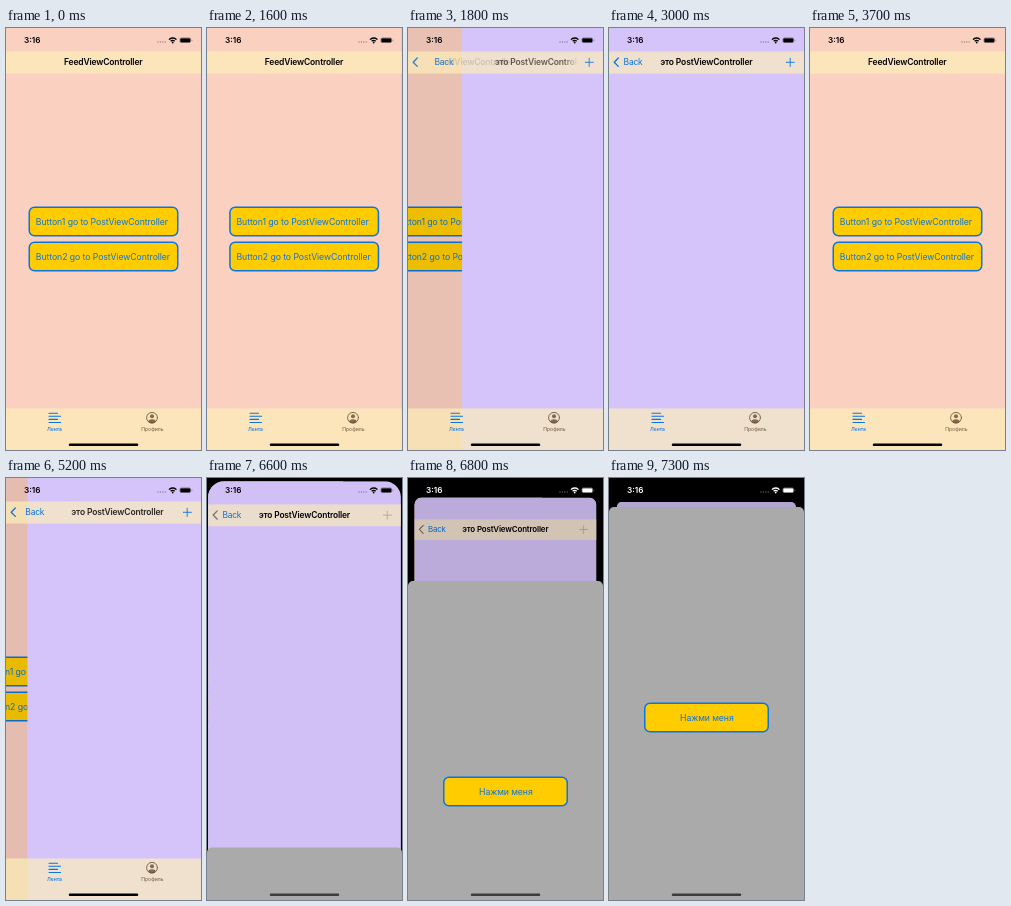
An HTML page with a canvas for the animation above (8000 ms loop, 195 by 422 pixels).

```html
<!DOCTYPE html>
<html lang="ru">
<head>
<meta charset="utf-8">
<title>Navigation demo</title>
<style>
html, body { margin: 0; width: 100%; height: 100%; overflow: hidden; background: #000; }
canvas { display: block; width: 100vw; height: 100vh; }
</style>
</head>
<body>
<canvas id="stage"></canvas>
<script>
const W = 195, H = 422, LOOP = 8000, STEP = 100;
const BLUE = '#0a74e0', YELLOW = '#ffcc00', PINK = '#fad0c1', PURPLE = '#d5c4fa';
const BAR = 'rgba(255,242,184,.65)', MUTED = 'rgba(80,55,30,.7)';
const FONT = 'Inter, "Open Sans", sans-serif';

const canvas = document.getElementById('stage');
const ctx = canvas.getContext('2d');
const ratio = window.devicePixelRatio || 1;
canvas.width = W * ratio;
canvas.height = H * ratio;

const lerp = (a, b, k) => a + (b - a) * k;
const clamp = k => Math.max(0, Math.min(1, k));

// Critically damped spring from 0 to 1, starting at the given time.
function spring(time, start) {
  const x = Math.max(0, time - start) * 0.0122;
  const rest = (1 + x) * Math.exp(-x);
  return rest < 0.0065 ? 1 : 1 - rest;
}

function layer(draw, alpha = 1) {
  ctx.save();
  ctx.globalAlpha *= alpha;
  draw();
  ctx.restore();
}

function rect(x, y, w, h, color) {
  ctx.fillStyle = color;
  ctx.fillRect(x, y, w, h);
}

function rounded(x, y, w, h, r, color) {
  ctx.beginPath();
  ctx.roundRect(x, y, w, h, r);
  ctx.fillStyle = color;
  ctx.fill();
}

function disc(x, y, r, color) {
  ctx.beginPath();
  ctx.arc(x, y, r, 0, 7);
  ctx.fillStyle = color;
  ctx.fill();
}

function line(points, color, width) {
  ctx.beginPath();
  points.forEach(([x, y]) => ctx.lineTo(x, y));
  ctx.strokeStyle = color;
  ctx.lineWidth = width;
  ctx.lineCap = ctx.lineJoin = 'round';
  ctx.stroke();
}

function text(str, x, y, size, { color = '#000', weight = 400, align = 'left', spacing = 0 } = {}) {
  ctx.font = `${weight} ${size}px ${FONT}`;
  ctx.letterSpacing = spacing + 'px';
  ctx.textAlign = align;
  ctx.fillStyle = color;
  ctx.fillText(str, x, y);
}

const title = (str, x, color = '#000') =>
  text(str, x, 37.3, 8.5, { color, weight: 600, spacing: -0.16 });

function button(str, x, y, w, textX) {
  const border = 1.5;
  rounded(x + border / 2, y + border / 2, w - border, 30 - border, 5.2, YELLOW);
  ctx.strokeStyle = BLUE;
  ctx.lineWidth = border;
  ctx.stroke();
  text(str, textX, y + 18.1, 8.7, { color: BLUE, spacing: -0.07 });
}

function pages(push) {
  layer(() => {
    ctx.translate(-0.3 * W * push, 0);
    rect(0, 0, W, H, PINK);
    button('Button1 go to PostViewController', 22.5, 178.5, 150, 29.8);
    button('Button2 go to PostViewController', 22.5, 213.5, 150, 29.8);
  });
  rect(0, 0, W, H, `rgba(0,0,0,${0.1 * push})`);
  rect(W * (1 - push), 0, W, H, PURPLE);
}

function navigationBar(push, disabled, sheet) {
  const rest = 1 - push;
  rect(0, 23.5, W, 22, BAR);
  layer(() => title('FeedViewController', 58 - 43 * push), clamp(1 - 1.2 * push));
  if (push === 0) return;
  layer(() => {
    const fade = ctx.createLinearGradient(156, 0, 170, 0);
    fade.addColorStop(0, '#000');
    fade.addColorStop(1, 'rgba(0,0,0,0)');
    title('это PostViewController', 51.2 + 128 * rest, fade);
  }, push ** 1.6);
  layer(() => {
    text('Back', 14.6 + 43 * rest, 37.3, 8.5, { color: BLUE, spacing: -0.25 });
    line([[9.3, 30], [5.2, 34.2], [9.3, 38.4]], sheet > 0 ? '#81766c' : BLUE, 1.3);
    const plus = disabled ? '#b9ab9d' : BLUE;
    line([[177, 34.3], [185.4, 34.3]], plus, 0.9);
    line([[181.2, 30.1], [181.2, 38.5]], plus, 0.9);
  }, clamp(1.25 * push));
}

function tabBar() {
  rect(0, 380.5, W, 41.5, BAR);
  [8.5, 11.5, 8.5, 11.5].forEach((w, i) => {
    const y = 385.2 + 3.1 * i;
    line([[43, y], [43 + w, y]], BLUE, 1.1);
  });
  text('Лента', 48.5, 403, 5, { color: BLUE, weight: 500, align: 'center' });
  layer(() => {
    ctx.beginPath();
    ctx.arc(146, 389.8, 5.4, 0, 7);
    ctx.strokeStyle = MUTED;
    ctx.lineWidth = 1;
    ctx.stroke();
    ctx.clip();
    disc(146, 388.3, 2, MUTED);
    ctx.beginPath();
    ctx.ellipse(146, 394.5, 3.9, 3.2, 0, 0, 7);
    ctx.fill();
  });
  text('Профиль', 146.4, 403, 5, { color: MUTED, weight: 500, align: 'center' });
}

function statusBar(sheet) {
  const shade = Math.round(255 * clamp((sheet - 0.2) / 0.6));
  const color = `rgb(${shade},${shade},${shade})`;
  text('3:16', 18, 15.2, 8.2, { color, weight: 600 });
  layer(() => {
    for (let i = 0; i < 4; i++) disc(152 + 2.4 * i, 14, 0.65, color);
  }, 0.4);
  ctx.strokeStyle = color;
  ctx.lineCap = 'butt';
  ctx.lineWidth = 1.3;
  [2.7, 5].forEach(r => {
    ctx.beginPath();
    ctx.arc(166.7, 15, r, -Math.PI * 0.77, -Math.PI * 0.23);
    ctx.stroke();
  });
  disc(166.7, 14.5, 0.9, color);
  layer(() => {
    rounded(173.6, 9.6, 11.4, 5.4, 1.7, color);
    rounded(185.5, 11.4, 0.8, 1.9, 0.4, color);
  }, 0.4);
  rounded(174.4, 10.4, 9.8, 3.8, 1, color);
}

function draw(time) {
  const push = time < 3110 ? spring(time, 1591)
    : time < 4891 ? 1 - spring(time, 3110)
    : spring(time, 4891);
  const sheet = spring(time, 6548);

  ctx.setTransform(canvas.width / W, 0, 0, canvas.height / H, 0, 0);
  rect(0, 0, W, H, '#000');

  layer(() => {
    const scale = 1 - 0.082 * sheet;
    ctx.translate(W / 2 * (1 - scale), 24 * sheet);
    ctx.scale(scale, scale);
    if (sheet > 0) {
      ctx.beginPath();
      ctx.roundRect(0, 0, W, H, lerp(18, 5.5, sheet));
      ctx.clip();
    }
    pages(push);
    navigationBar(push, time >= 6500, sheet);
    tabBar();
    rect(0, 0, W, H, `rgba(0,0,0,${0.16 * sheet})`);
  });

  if (sheet > 0) layer(() => {
    ctx.translate(0, lerp(H, 29, sheet));
    rounded(0, 0, W, H, [5, 5, 0, 0], '#aaa');
    button('Нажми меня', 35, 195.5, 125, 71);
  });

  statusBar(sheet);
  rounded(62.75, 415.5, 69.5, 2.5, 1.25, sheet > 0 ? '#3c3c3c' : '#000');
}

const begin = performance.now();
function tick() {
  const time = (performance.now() - begin) % LOOP;
  draw(Math.floor(time / STEP) * STEP);
  requestAnimationFrame(tick);
}
tick();
</script>
</body>
</html>
```
